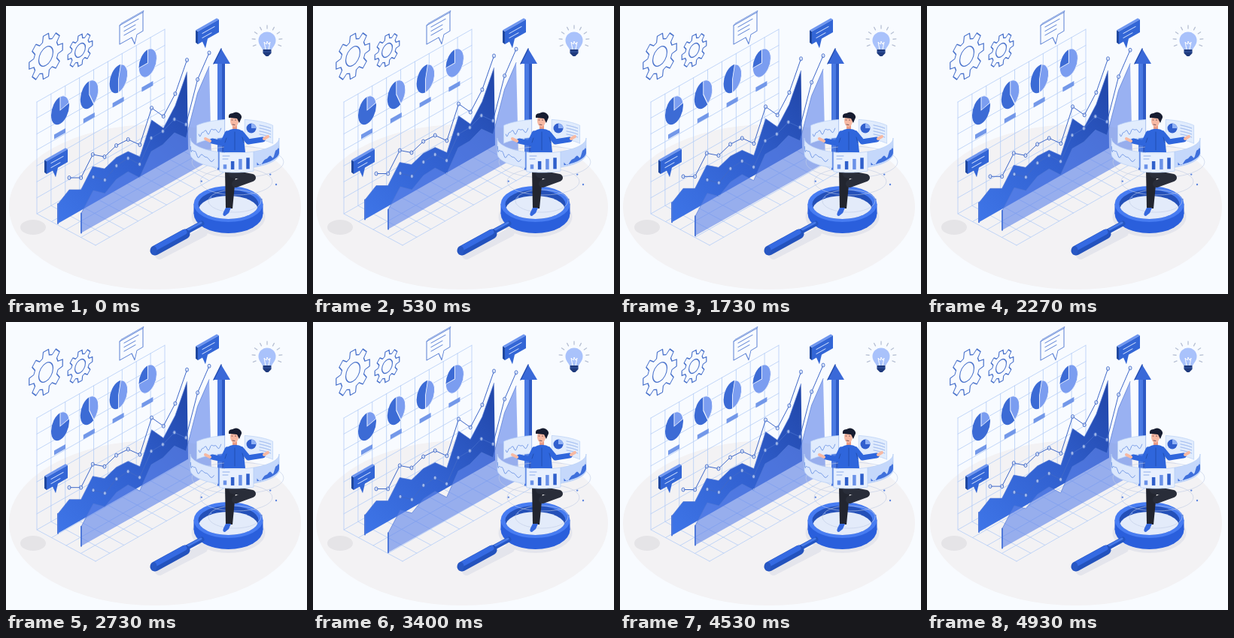
An HTML page for the animation above (5 s loop, 400 by 384 pixels).

```html
<!DOCTYPE html>
<html lang="en">
<head>
<meta charset="utf-8">
<title>Business growth</title>
<style>
html, body { margin: 0; width: 100%; height: 100%; overflow: hidden; background: #f8fbff; }
svg { display: block; width: 100vw; height: 100vh; }
</style>
</head>
<body>
<svg id="stage" viewBox="0 0 400 384" fill="none" stroke-linejoin="round">
  <defs>
    <linearGradient id="backFill" x1="0" y1="1" x2="1" y2="0">
      <stop offset="0" stop-color="#3e75e8"/><stop offset=".5" stop-color="#3160cf"/><stop offset="1" stop-color="#2045a7"/>
    </linearGradient>
  </defs>
</svg>

<script>
const NS = "http://www.w3.org/2000/svg";
const stage = document.getElementById("stage");
const PAPER = "#f8fbff", RISE = .57, TURN = Math.PI * 2;
const range = n => [...Array(n).keys()];
const poly = pts => "M" + pts.map(p => p.join(" ")).join("L");

function add(parent, tag, attrs = {}) {
  const el = document.createElementNS(NS, tag);
  for (const k in attrs) el.setAttribute(k, attrs[k]);
  parent.append(el);
  return el;
}
const group = (attrs, parent = stage) => add(parent, "g", attrs);
const fill = (d, color, parent = stage) => add(parent, "path", { d, fill: color });
const line = (d, color, width = 1, parent = stage) =>
  add(parent, "path", { d, stroke: color, "stroke-width": width, "stroke-linecap": "round" });
const oval = (cx, cy, rx, ry, attrs, parent = stage) => add(parent, "ellipse", { cx, cy, rx, ry, ...attrs });
const wallGroup = (x, y) => group({ transform: `matrix(1 ${-RISE} 0 1 ${x} ${y})` });

// Wall and floor share the back edge
function grid(x, y, cols, rows, deep) {
  const w = 170, rise = w * RISE, h = 149, dx = 78, dy = 42, floor = y + h;
  let d = "";
  for (let i = 0; i <= cols; i++) {
    const px = x + w * i / cols, up = rise * i / cols;
    d += `M${px} ${y - up}v${h}l${dx} ${dy}`;
  }
  for (let i = 0; i <= rows; i++) d += `M${x} ${y + h * i / rows}l${w} ${-rise}`;
  for (let i = 1; i <= deep; i++) d += `M${x + dx * i / deep} ${floor + dy * i / deep}l${w} ${-rise}`;
  line(d, "#b4cdf7", .8);
}

function gear(x, y, rx, ry) {
  const g = wallGroup(x, y), teeth = 8;
  const pts = range(teeth * 4).map(k => {
    const r = k % 4 % 3 ? 1 : .74;
    const a = (Math.floor(k / 4) + [-.34, -.2, .2, .34][k % 4]) / teeth * TURN;
    return [rx * r * Math.cos(a), ry * r * Math.sin(a)];
  });
  line(poly(pts) + "Z", "#4871cb", 1.2, g);
  oval(0, 0, rx * .42, ry * .42, { stroke: "#4871cb", "stroke-width": 1.2 }, g);
}

// Light sector between two angles, in turns clockwise from the top
function pie(i, from, to) {
  const g = wallGroup(72 + 38.8 * i, 139 - 21 * i), rx = 12, ry = 18;
  const at = t => `${rx * Math.sin(t * TURN)} ${-ry * Math.cos(t * TURN)}`;
  const big = to - from > .5 ? 1 : 0;
  oval(0, 0, rx, ry, { fill: "#3c6bd5" }, g);
  add(g, "path", {
    d: `M0 0L${at(from)}A${rx} ${ry} 0 ${big} 1 ${at(to)}Z`,
    fill: "#7b9df0", stroke: PAPER, "stroke-width": .9
  });
  add(g, "rect", { x: -8, y: 28, width: 15, height: 6, fill: "#7398e9" }, g);
}

function bubble(x, y, w, h, tail, solid) {
  const g = wallGroup(x, y);
  const shape = `M0 0H${w}V${h}H${tail + 3}L${tail} ${h + 11}L${tail - 4} ${h}H0Z`;
  if (solid) {
    fill(`M0 0L-3 -3.500V${h - 4}L0 ${h}Z`, "#1f479f", g);
    fill(`M0 0L-3 -3.500H${w - 3}L${w} 0Z`, "#6f96ef", g);
    fill(shape, "#3366d6", g);
  } else {
    line(shape, "#5b80d4", 1, g);
    line(`M0 0l2 -1.500H${w + 1}L${w} 0`, "#5b80d4", .7, g);
  }
  const gap = solid ? 6 : 5.5;
  for (let ly = gap; ly < h - 3; ly += gap)
    line(`M6 ${ly}H${w - (ly > gap * 1.5 ? 10 : 6)}`, solid ? "#d8e5ff" : "#5b80d4", 1, g);
}

// Area with its marker line a fixed gap above
function chart(x, step, heights, base, gap, areaFill, opacity) {
  const g = group();
  const top = heights.map((y, i) => [x + step * i, y]);
  const [[, rightY], [leftX, leftY]] = base;
  const outline = [[leftX, leftY - 26], ...top];
  add(g, "path", { d: poly([...outline, ...base]) + "Z", fill: areaFill, "fill-opacity": opacity });
  line(poly(outline), "#5279d6", .7, g);
  line(`M${leftX} ${leftY}v-26`, "#4f79da", 2, g);
  const marks = top.map(([px, y]) => [px, y - gap]);
  line(poly(marks), "#3f68c8", 1, g);
  for (const [px, y] of marks)
    oval(px, y, 2, 2.5, { fill: "#eaf1ff", "fill-opacity": .6, stroke: "#3f68c8", "stroke-width": .9 }, g);
  return g;
}

function bulb(x, y) {
  for (const i of range(9)) {
    const a = Math.PI * (.88 + i * .155), at = r => `${x + r * Math.cos(a)} ${y + r * Math.sin(a)}`;
    line(`M${at(16)}L${at(20)}`, "#b7c0d4", 1.3);
  }
  oval(x, y, 11.5, 11.5, { fill: "#a9c2fb" });
  fill(`M${x - 9} ${y + 7}h18l-3 5h-12Z`, "#a9c2fb");
  line(`M${x - 2} ${y + 12}l-2 -10 3 3 1 -4 2 4 2 -3 -2 10`, "#fff");
  fill(`M${x - 5.5} ${y + 12}h11v5l-4 4h-3l-4 -4Z`, "#1f3a7d");
  line(`M${x - 5} ${y + 15}h10`, "#466bbd", .7);
}

function arrow(x, y) {
  fill(`M${x - 5} ${y + 14}h6v148h-6Z`, "#4a79e2");
  fill(`M${x + 1} ${y + 14}h4v146l-4 2Z`, "#2e5ac4");
  fill(`M${x - 10} ${y + 20}L${x} ${y}L${x + 12} ${y + 20}Z`, "#3a69d8");
  line(`M${x - 10} ${y + 20}L${x} ${y}`, "#264fb2", 1.5);
}

function magnifier(x, y) {
  oval(x, y + 17, 49, 27, { fill: "#e4e5ec" });
  line("M204 332L262 302", "#e4e5ec", 12);
  // Outer wall, rim, inner wall, ground seen through
  oval(x, y + 13, 46, 26, { fill: "#2a5fdc" });
  fill(`M${x - 46} ${y}h92v13h-92Z`, "#2a5fdc");
  oval(x, y, 46, 24, { fill: "#477cf2" });
  oval(x, y + .5, 40, 19.500, { fill: "#2450b8" });
  const id = "lens", clip = add(stage, "clipPath", { id });
  oval(x, y + .5, 40, 19.500, {}, clip);
  oval(x, y + 9, 40, 20, { fill: "#e3ebfa", "clip-path": `url(#${id})` });
  line("M236 303L260 290", "#2456c4", 7);
  line("M237 301L259 289", "#477ae8", 3);
  line("M198 326L238 304", "#2352bd", 13);
  line("M198 323L237 301.500", "#356ae2", 7);
  oval(196.500, 326, 4, 6, { fill: "#2858c4" });
}

// Panels sit on a cylinder around the man; angles in degrees
const RING = { x: 304, rx: 59 };
function onRing(deg, y, ry) {
  const a = deg / 360 * TURN;
  return [RING.x + RING.rx * Math.cos(a), y + ry * Math.sin(a)];
}
const arc = (from, to, y, ry, wave = () => 0) =>
  range(25).map(i => onRing(from + (to - from) * i / 24, y + wave(i / 24), ry));

function panel(from, to, y, ry, h, color) {
  const d = poly([...arc(from, to, y, ry), ...arc(to, from, y + h, ry)]) + "Z";
  add(stage, "path", { d, fill: color, stroke: "#b6cef5", "stroke-width": .7 });
}
const squiggle = t => 2.5 * Math.sin(t * 16) + 1.5 * Math.sin(t * 29);

function rearPanels() {
  panel(211, 257, 168, 17, 24, "#e1ecfd");
  panel(283, 329, 168, 17, 24, "#e1ecfd");
  panel(112, 180, 176, 20, 21, "#dbe7fc");
  panel(0, 65, 176, 20, 21, "#c5d8fb");
  line(poly(arc(216, 252, 181, 17, squiggle)), "#6f96e5", .9);
  line(poly(arc(118, 174, 187, 20, squiggle)), "#6f96e5", .9);
  const hill = t => 4 + 9 * t + squiggle(t);
  fill(poly([...arc(2, 60, 180, 20, hill), ...arc(60, 2, 195, 20)]) + "Z", "#3f70dc");
  for (const i of range(4)) line(poly(arc(304, 324, 173 + 4 * i, 17)), "#86a7e9", .9);
  oval(326, 163, 6.5, 6.5, { fill: "#315fce" });
  fill("M326 163v-6.500a6.500 6.500 0 0 1 6.500 6.500Z", "#8fb0f5");
}

function frontPanel() {
  panel(65, 110, 176, 20, 26, "#e8f0fe");
  for (const i of range(4)) {
    const [x, y] = onRing(105 - 10 * i, 198, 20), h = [6, 11, 14, 15][i];
    fill(`M${x} ${y}v${-h}h4.500v${h}Z`, i % 2 ? "#2f5fcb" : "#6a91e8");
  }
  for (const i of range(2)) line(`M288 ${200 + 4 * i}h${9 - 2 * i}`, "#84a6e8", .9);
}

function man() {
  const skin = "#f7b9a3", shirt = "#2f66dc", pants = "#22252f";
  fill("M291 218H306L301 270H292Z", pants);
  line("M301 224L327 229L305 237", "#292d39", 10);
  fill("M292 269h7l-3 7 -5 4q-4 0 -2 -5Z", "#3568de");
  line("M304 158v8", "#e99d86", 6);
  fill("M292 168Q304 160 315 167L318 195H289Z", shirt);
  line("M294 170L288 183L274 180", shirt, 7);
  line("M313 170L322 181L341 178", shirt, 7);
  line("M291 182l2 -6M316 182l-2 -7M304 168v24", "#214dac", .9);
  line("M271 180L265 177", skin, 4);
  line("M343 177L348 174", skin, 4);
  oval(303.5, 153, 5.5, 8, { fill: skin });
  fill("M296 149q-1 -6 5 -6q5 -3 9 0q5 4 2 8l-2 5 -3 -6 -9 -1Z", "#171d31");
  line("M300 152h1M304.500 152h1M301 158l3 .5", "#583a43", .8);
}

function orbits() {
  for (const i of range(3))
    oval(308 - 2 * i, 208 + 26 * i, 61 - 13 * i, 21 - 3 * i, { stroke: "#bfcce5", "stroke-width": .6 });
  for (const i of range(7)) {
    const a = i * 2.4;
    oval(309 + 50 * Math.cos(a), 238 + 25 * Math.sin(a), 1.2, 1.2, { fill: "#5f87de" });
  }
}

oval(198, 268, 194, 110, { fill: "#f3f2f4" });
oval(36, 295, 17, 10, { fill: "#e5e4e7" });
grid(41, 128, 9, 7, 4);
gear(53, 67, 22.5, 29);
gear(98.5, 59, 16.5, 20.5);
[[0, .22], [0, .42], [.04, .5], [0, .75]].forEach(([from, to], i) => pie(i, from, to));
bubble(151, 26, 31, 25, 20, false);
arrow(286, 57);

const back = chart(84, 15.65, [245, 245, 214, 217, 202, 194, 201, 152, 163, 133, 88],
  [[242, 191], [69, 290]], 16, "url(#backFill)", 1);
const front = chart(116, 15.4, [246, 250, 231, 221, 229, 194, 185, 169, 176, 116, 80.5],
  [[273, 205], [100, 302.5]], 18, "#5f85ea", .62);

bubble(255, 34, 28, 17, 10, true);
bubble(54, 207, 28, 17, 12, true);
bulb(347, 46);
magnifier(295.5, 264);
orbits();
rearPanels();
man();
frontPanel();

const LOOP = 5000, CYCLE = 2000;
const shift = (el, y) => el.setAttribute("transform", `translate(0 ${y.toFixed(2)})`);

// The front chart bobs a quarter cycle ahead of the back one
function frame(now) {
  const a = now % LOOP / CYCLE * TURN;
  shift(back, -5 * (1 - Math.cos(a)));
  shift(front, -5 * Math.sin(a));
  requestAnimationFrame(frame);
}
frame(performance.now());
</script>
</body>
</html>
```
